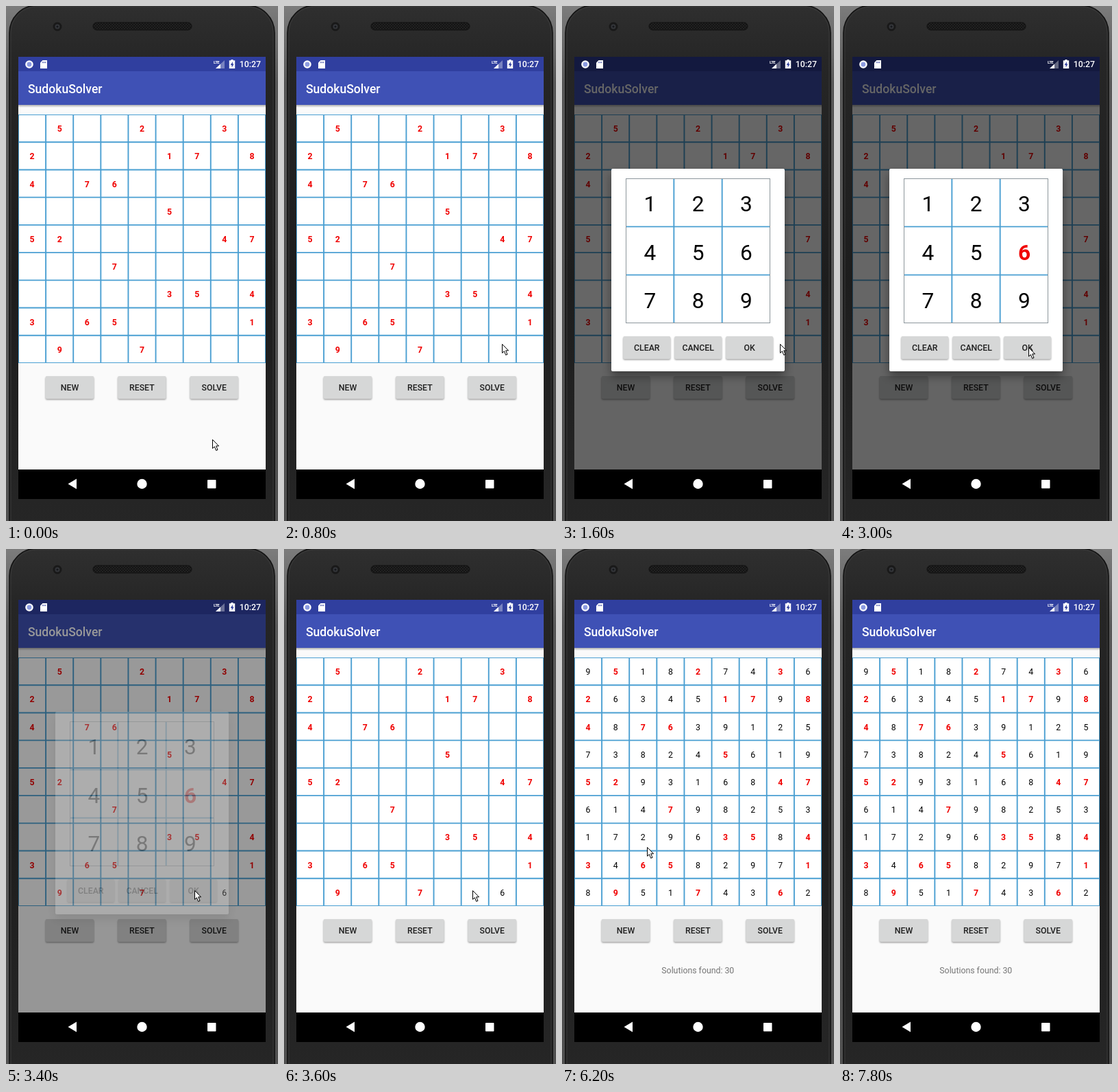
Recreate the animation shown at these times as an HTML page. Size 397 px wide and 750 px high, loop 8400 ms.

```html
<!DOCTYPE html>
<html lang="en">
<head>
<meta charset="utf-8">
<title>Sudoku solver demo</title>
<style>
html, body { margin: 0; width: 100%; height: 100%; overflow: hidden; background: #666; }
svg { display: block; width: 397px; height: 750px; }
text { font-family: Roboto, "Open Sans", sans-serif; font-size: 12.3px; }
.mid { text-anchor: middle; }
.label { font-weight: 500; fill: #202020; }
.given { font-weight: 700; fill: #f00000; }
.pad { font-size: 31.6px; }
</style>
</head>
<body>
<svg id="stage" viewBox="0 0 397 750" xmlns="http://www.w3.org/2000/svg">
  <defs>
    <linearGradient id="side" x2="0" y2="1">
      <stop offset="0" stop-color="#7c7c7c"/><stop offset=".15" stop-color="#585858"/><stop offset="1" stop-color="#505050"/>
    </linearGradient>
    <linearGradient id="body" x2="0" y2="1">
      <stop offset="0" stop-color="#2f2f2f"/><stop offset=".1" stop-color="#262626"/>
      <stop offset=".5" stop-color="#1d1d1d"/><stop offset="1" stop-color="#272727"/>
    </linearGradient>
    <linearGradient id="drop" x2="0" y2="1">
      <stop offset="0" stop-opacity=".3"/><stop offset="1" stop-opacity="0"/>
    </linearGradient>
    <pattern id="mesh" width="4" height="4" patternUnits="userSpaceOnUse">
      <rect width="4" height="4" fill="#141414"/>
      <circle cx="1" cy="1" r=".8" fill="#303030"/><circle cx="3" cy="3" r=".8" fill="#303030"/>
    </pattern>
    <filter id="soft" x="-20%" y="-20%" width="140%" height="150%"><feGaussianBlur stdDeviation="7"/></filter>
    <filter id="low" x="-10%" y="-20%" width="120%" height="150%"><feGaussianBlur stdDeviation="1"/></filter>
  </defs>

  <rect width="397" height="750" fill="url(#side)"/>
  <rect x="5" y="-1" width="387" height="800" rx="40" fill="url(#body)" stroke="#121212" stroke-width="1.5"/>
  <rect x="7" y="1" width="383" height="796" rx="38" fill="none" stroke="#3a3a3a"/>
  <circle cx="75" cy="30" r="6.5" fill="#191919"/>
  <circle cx="75" cy="30" r="3.5" fill="#34363a"/>
  <circle cx="75" cy="30" r="1.6" fill="#17181b"/>
  <rect x="127" y="24" width="144" height="11" rx="5.5" fill="url(#mesh)" stroke="#111"/>

  <rect x="18" y="74" width="361" height="644"/>
  <rect x="18" y="144" width="361" height="531" fill="#fafafa"/>
  <rect x="18" y="144" width="361" height="4" fill="url(#drop)"/>
  <rect x="18" y="74" width="361" height="21" fill="#303f9f"/>
  <rect x="18" y="95" width="361" height="49" fill="#3f51b5"/>
  <text x="32" y="126.8" fill="#fff" style="font-size:17.57px;font-weight:500">SudokuSolver</text>
  <g id="board"></g>
  <g id="actions"></g>
  <text id="result" class="mid" x="198.3" y="618" fill="#757575">Solutions found: 30</text>
  <rect id="dim" x="18" y="74" width="361" height="601"/>

  <g fill="#fff">
    <circle cx="34" cy="85" r="4.6" fill="#8c9be0" stroke="#fff" stroke-width="2.4"/>
    <path d="M53.5 79H60V91H50V82.5Z"/>
    <path d="M53.7 81v2.2M55.7 81v2.2M57.7 81v2.2" stroke="#303f9f" stroke-width=".9"/>
    <path d="M319 79V91H306Z" opacity=".35"/>
    <path d="M313 84.6V91H306Z"/>
    <text x="303" y="84" style="font-size:6px;font-weight:700" letter-spacing="-.5">LTE</text>
    <path d="M328.5 78h3v1.3h2.7V91h-8.4V79.3h2.7Z"/>
    <path d="M331 81L327.6 86H329.6V89.6L332.6 84.6H330.8Z" fill="#303f9f"/>
    <text x="340.8" y="89.4" style="font-weight:500">10:27</text>
    <path d="M90.5 696L103 688.5V703.5Z"/>
    <circle cx="198.5" cy="696" r="7.2"/>
    <rect x="294" y="690" width="12.5" height="12.5" rx=".8"/>
  </g>

  <g id="dialog">
    <rect x="72" y="244" width="253" height="295" rx="3" opacity=".4" filter="url(#soft)"/>
    <rect x="72" y="237" width="253" height="295" rx="2" fill="#fff"/>
    <g id="pad"></g>
  </g>
  <path id="cursor" d="M.5 .5V13.3L3.4 10.7L5.7 16.3L8 15.3L5.7 9.8H9.6Z" fill="#fff" stroke="#000" stroke-linejoin="round"/>
</svg>
<script>
const LOOP = 8400, STEP = 200;
const FADE_IN = 1400, PICKED = 2400, FADE_OUT = 3400, CLOSED = 3600;
const PRESS = 4600, SOLVED = 4800, CURSOR_GONE = 7800;
const BLUE = '#4a9fd2';
const givens = '.5..2..3. 2....17.8 4.76..... .....5... 52.....47 ...7..... .....35.4 3.65....1 .9..7....'.split(' ');
const solution = '951827436 263451798 487639125 738245619 529316847 614798253 172963584 346582971 895174362'.split(' ');
// time, x, y of the pointer tip
const path = [
  [0, 301, 631], [400, 321, 570], [800, 318, 492], [1600, 318, 492], [2200, 273, 378],
  [2400, 273, 378], [3000, 275, 497], [3600, 275, 497], [4200, 302, 555], [4800, 302, 555],
  [5600, 251, 532], [6200, 124, 434], [6400, 132, 350], [6600, 172, 277], [6800, 180, 292],
  [7000, 225, 400], [7200, 280, 535], [7400, 335, 300], [7600, 361, 74]
];

const $ = id => document.getElementById(id);

function add(parent, tag, attrs, text) {
  const el = document.createElementNS('http://www.w3.org/2000/svg', tag);
  for (const k in attrs) el.setAttribute(k, attrs[k]);
  if (text) el.textContent = text;
  parent.appendChild(el);
  return el;
}

function grid(parent, x, y, w, h, n, edge) {
  add(parent, 'rect', { x, y, width: w, height: h, fill: '#fff' });
  let d = '';
  for (let i = 1; i < n; i++) d += `M${x + w * i / n} ${y}v${h}M${x} ${y + h * i / n}h${w}`;
  add(parent, 'path', { d, stroke: BLUE, 'stroke-width': 1.9 });
  add(parent, 'rect', { x: x + .5, y: y + .5, width: w - 1, height: h - 1, fill: 'none', stroke: edge });
}

function button(parent, x, y, w, label) {
  add(parent, 'rect', { x, y: y + 1.5, width: w, height: 33, rx: 2, opacity: .35, filter: 'url(#low)' });
  const face = add(parent, 'rect', { x, y, width: w, height: 33, rx: 2, fill: '#d6d7d7' });
  add(parent, 'text', { x: x + w / 2, y: y + 20.9, class: 'mid label' }, label);
  return face;
}

grid($('board'), 18, 158, 361, 362, 9, BLUE);
const cells = givens.map((row, r) => [...row].map((_, c) =>
  add($('board'), 'text', { x: 18 + 40.11 * (c + .5), y: 183.2 + 40.2 * r })));
const [, , solve] = ['NEW', 'RESET', 'SOLVE'].map((s, i) => button($('actions'), 57.7 + 105.4 * i, 539, 70.5, s));

grid($('pad'), 93, 251, 211, 211, 3, '#8d969c');
const keys = [...'123456789'].map((s, i) => add($('pad'), 'text',
  { x: 128.4 + 70.3 * (i % 3), y: 299.3 + 70.3 * Math.floor(i / 3), class: 'mid pad' }, s));
['CLEAR', 'CANCEL', 'OK'].forEach((s, i) => button($('pad'), 89.3 + 74.9 * i, 481, 69, s));

function pointer(t) {
  const i = path.findIndex(p => p[0] > t);
  if (i < 0) return path[path.length - 1].slice(1);
  const [a, b] = [path[i - 1], path[i]];
  const k = (t - a[0]) / (b[0] - a[0]);
  return [1, 2].map(j => Math.round(a[j] + (b[j] - a[j]) * k));
}

function render(t) {
  const entered = t >= FADE_OUT, solved = t >= SOLVED;
  cells.forEach((row, r) => row.forEach((cell, c) => {
    const mine = r === 8 && c === 7 && entered;
    const given = givens[r][c] !== '.';
    cell.textContent = given || mine || solved ? solution[r][c] : '';
    cell.setAttribute('class', given || mine && solved ? 'mid given' : 'mid');
  }));
  keys[5].setAttribute('class', t >= PICKED ? 'mid pad given' : 'mid pad');

  const open = t >= FADE_IN && t < CLOSED;
  const partial = t < FADE_IN + STEP || entered;
  $('dim').setAttribute('opacity', open ? (partial ? .4 : .6) : 0);
  $('dialog').setAttribute('opacity', open ? (entered ? .2 : 1) : 0);
  solve.setAttribute('fill', t >= PRESS && t < SOLVED ? '#c2c3c3' : '#d6d7d7');
  $('result').setAttribute('opacity', solved ? 1 : 0);

  $('cursor').setAttribute('transform', `translate(${pointer(t)})`);
  $('cursor').setAttribute('opacity', t < CURSOR_GONE ? 1 : 0);
}

function tick() {
  const t = performance.now() % LOOP;
  render(Math.floor(t / STEP) * STEP);
  requestAnimationFrame(tick);
}
tick();
</script>
</body>
</html>
```
